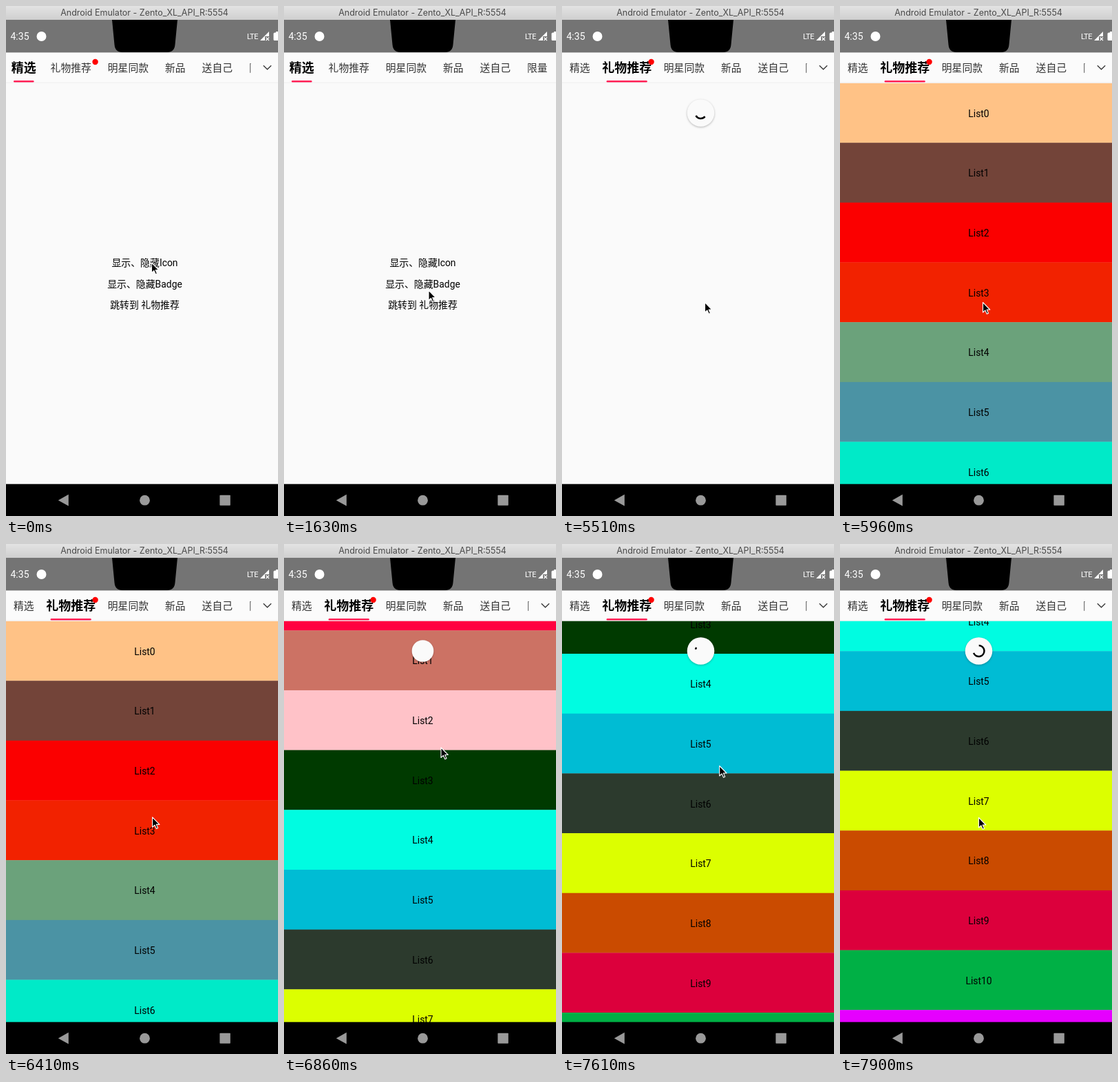
An HTML page that plays this animation: 395 by 739 pixels, repeating every 8 s.

```html
<!DOCTYPE html>
<html lang="zh-CN">
<head>
<meta charset="utf-8">
<style>
  html, body { margin: 0; width: 100%; height: 100%; overflow: hidden; background: #fafafa; }
  svg { display: block; width: 395px; height: 739px; }
  text { font-family: Roboto, "Noto Sans CJK SC", "Noto Sans CJK", sans-serif; }
  .mid { text-anchor: middle; }
  .body { font-size: 13.9px; fill: #000; }
  .tab { font-size: 14.8px; fill: #333; }
  .tab.on { font-size: 18px; font-weight: 700; fill: #000; }
  .title { font-family: Inter, sans-serif; font-size: 12.5px; fill: #4a4a4a; }
  #puck { filter: drop-shadow(0 1px 1.5px rgba(0, 0, 0, .28)); }
</style>
</head>
<body>
<svg viewBox="0 0 395 739">
  <defs>
    <linearGradient id="bar" x2="0" y2="1">
      <stop stop-color="#e3e3e3"/><stop offset="1" stop-color="#cfcfcf"/>
    </linearGradient>
    <clipPath id="strip"><rect id="stripBox" y="67" width="395" height="44"/></clipPath>
  </defs>
  <rect width="395" height="739" fill="#fafafa"/>

  <g id="home" class="body mid"></g>
  <g id="gifts">
    <g id="list" class="body mid"></g>
    <g id="spinner">
      <circle id="puck" r="19.8" fill="#fafafa"/>
      <path id="arc" fill="none" stroke="#000" stroke-width="2.5"/>
    </g>
  </g>

  <rect y="67" width="395" height="44.5" fill="#fbfbfb"/>
  <rect y="110.5" width="395" height="1" fill="#f0f0f0"/>
  <g id="tabs" class="mid" clip-path="url(#strip)"></g>
  <rect id="underline" y="108" height="2.6" rx="1.3" fill="#ff1f55"/>
  <circle id="badge" cx="129.6" cy="81" r="4.2" fill="#f00"/>
  <path id="chevron" d="M373.8 86.2l5.7 5.6 5.7-5.6" fill="none" stroke="#333" stroke-width="1.2"/>

  <rect y="20" width="395" height="47.4" fill="#747474"/>
  <path d="M154 20L157.5 56Q158.5 67 169 67H234Q244.5 67 245.5 56L249 20Z"/>
  <g fill="#fff">
    <text x="6.5" y="49" font-size="14">4:35</text>
    <circle cx="51.5" cy="44" r="7"/>
    <text x="350" y="48" font-size="11" letter-spacing="-.4">LTE</text>
    <path d="M382 37V44H376V50H369Z"/>
    <path d="M377.5 45.5l4.5 4.5m0-4.5l-4.5 4.5" stroke="#fff" stroke-width="1.2"/>
    <path d="M390.5 38.500h1.500v-1.500h4v13h-6q-1.500 0-1.500-1.500v-8.500q0-1.500 2-1.500z"/>
  </g>
  <rect width="395" height="20" fill="url(#bar)"/>
  <text class="title mid" x="201" y="14.2">Android Emulator - Zento_XL_API_R:5554</text>

  <rect y="692.7" width="395" height="47"/>
  <g fill="#999">
    <path d="M75.8 716.2L90.8 707.8V724.6Z"/>
    <circle cx="201.5" cy="716.2" r="7.4"/>
    <rect x="310.4" y="708.8" width="15.4" height="15" rx=".8"/>
  </g>
  <path id="cursor" d="M0 0V14.5L3.4 11.4L5.8 16.7L8 15.7L5.7 10.5H10.3Z"
        stroke="#fff" stroke-width="1.1" stroke-linejoin="round"/>
</svg>
<script>
const LOOP = 8000, STEP = 149;
const ROW = 86.67, TOP = 111.5, WIDTH = 403, CENTER = 201.5;
const EM = 14.8, GAP = 24;

const HIDE_ICON = 2, HIDE_BADGE = 11, SHOW_BADGE = 15, SHOW_ICON = 21;
const OPEN_GIFTS = 27, LOADED = 38, SETTLED = 40, RELOAD = 46;

// Pointer glides: first step, last step, destination.
const glides = [
  [4, 8, 210, 412], [15, 17, 232.5, 377], [21, 24, 207.5, 429.5],
  [42, 46, 228, 295], [46, 48, 269.5, 209], [48, 53, 201.5, 396.5]
];

const firstColors = '#ffc286 #734439 #fb0000 #f22200 #6ba27b #4b93a4 #00eac8'.split(' ');
const nextColors = ('#ff0040 #cc7264 #ffc2c8 #003a00 #00fce1 #00bcd4 ' +
  '#2c3a2d #dcff00 #ca4b00 #dc003c #00b045 #e600ff').split(' ');

const $ = id => document.getElementById(id);
const ramp = (v, from, to) => Math.min(1, Math.max(0, (v - from) / (to - from)));
const mix = (a, b, u) => a + (b - a) * u;

function add(parent, name, attrs, text = '') {
  const el = document.createElementNS(parent.namespaceURI, name);
  for (const key in attrs) el.setAttribute(key, attrs[key]);
  el.textContent = text;
  return parent.appendChild(el);
}

function set(id, attrs) {
  for (const key in attrs) $(id).setAttribute(key, attrs[key]);
}

const move = (id, x, y, more = '') => set(id, { transform: `translate(${x} ${y}) ${more}` });
const show = (id, on) => set(id, { visibility: on ? 'visible' : 'hidden' });

['显示、隐藏Icon', '显示、隐藏Badge', '跳转到 礼物推荐'].forEach((label, i) =>
  add($('home'), 'text', { x: CENTER, y: 377.4 + 30.3 * i }, label));

let left = 11;
const tabs = ['精选', '礼物推荐', '明星同款', '新品', '送自己', '限量'].map(label => {
  const tab = { x: left, width: label.length * EM };
  tab.el = add($('tabs'), 'text', { x: tab.x + tab.width / 2 }, label);
  left += tab.width + GAP;
  return tab;
});

const rows = nextColors.map((_, i) => {
  const y = TOP + i * ROW;
  const rect = add($('list'), 'rect', { y, width: 395, height: ROW + .3 });
  add($('list'), 'text', { x: CENTER, y: y + 49.2 }, 'List' + i);
  return rect;
});

function pointerAt(step) {
  return glides.reduce(([px, py], [from, to, x, y]) => {
    const u = ramp(step, from, to);
    return [mix(px, x, u), mix(py, y, u)];
  }, [211.5, 372]);
}

function spinnerScale(step) {
  if (step >= SETTLED) return ramp(step, RELOAD - 1, RELOAD + .25);
  if (step >= LOADED) return .6;
  return step >= OPEN_GIFTS ? 1 : 0;
}

// A turning arc whose head runs ahead in the first half of a cycle and whose tail follows in the second.
function arcPath(ms, began, r = 8) {
  const cycles = (ms - began) / 1332, turn = Math.floor(cycles), u = cycles - turn;
  const swing = x => 3.5 * x * x / (3.5 * x * x + (1 - x) ** 2);
  const base = 189 + .248 * ms + 284 * turn;
  const tail = base + 284 * swing(ramp(u, .5, 1));
  const head = base + 284 * swing(ramp(u, 0, .5)) + 4;
  const point = deg => {
    const a = deg * Math.PI / 180;
    return `${r * Math.cos(a)} ${r * Math.sin(a)}`;
  };
  return `M${point(tail)}A${r} ${r} 0 ${head - tail > 180 ? 1 : 0} 1 ${point(head)}`;
}

function draw(step) {
  const ms = step * STEP;
  const page = 1 - (1 - ramp(step, OPEN_GIFTS - 1, OPEN_GIFTS + 1)) ** 2;
  const scroll = Math.max(0, .3037 * (ms - 6614));
  const scale = spinnerScale(step);
  const selected = step < OPEN_GIFTS ? 0 : 1;
  const iconShown = step < HIDE_ICON || step >= SHOW_ICON;
  const colors = step < RELOAD ? firstColors : nextColors;

  move('cursor', ...pointerAt(step));
  move('home', -WIDTH * page, 0);
  move('gifts', WIDTH * (1 - page), 0);
  move('list', 0, -scroll);
  set('list', { opacity: step < LOADED ? 0 : step < SETTLED ? .6 : 1 });
  rows.forEach((row, i) => row.setAttribute('fill', colors[i] || '#fafafa'));

  show('spinner', scale > 0);
  move('spinner', CENTER, 155, `scale(${scale})`);
  show('arc', scale === 1);
  set('arc', { d: arcPath(ms, step < SETTLED ? 3985 : 6188) });

  tabs.forEach(({ el }, i) => {
    el.setAttribute('class', i === selected ? 'tab on' : 'tab');
    el.setAttribute('y', i === selected ? 95.8 : 94.7);
  });
  set('underline', { x: mix(tabs[0].x, tabs[1].x, page), width: mix(tabs[0].width, tabs[1].width, page) });
  set('stripBox', { width: iconShown ? 355.5 : 395 });
  show('chevron', iconShown);
  show('badge', step < HIDE_BADGE || step >= SHOW_BADGE);
}

const start = performance.now();
function frame() {
  const t = (performance.now() - start) % LOOP;
  draw(Math.floor((t + 8) / STEP));
  requestAnimationFrame(frame);
}
frame();
</script>
</body>
</html>
```
